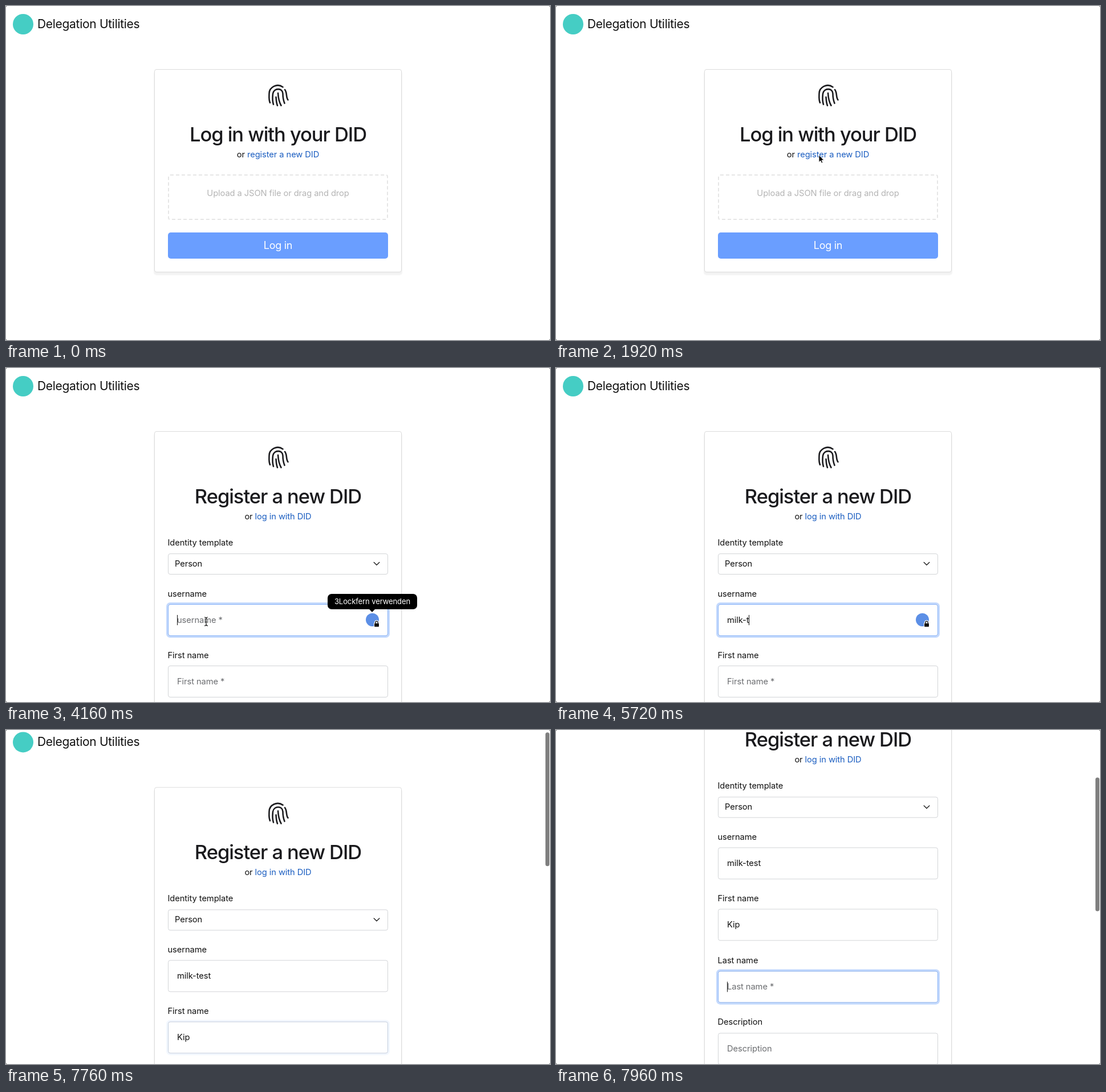
An HTML page for the animation above (8 s loop, 954 by 587 pixels).

```html
<!DOCTYPE html>
<html lang="en">
<head>
<meta charset="utf-8">
<title>DID login</title>
<style>
  html, body { margin: 0; width: 100%; height: 100%; overflow: hidden; background: #333; }
  #stage {
    position: relative; width: 954px; height: 587px; overflow: hidden;
    background: #fff; border-radius: 2px;
    font: 14.7px/20px Inter, "Liberation Sans", sans-serif;
    font-optical-sizing: none; letter-spacing: -.08px; color: #111; white-space: nowrap;
  }
  #stage * { box-sizing: border-box; }
  #page, #page > *, .card > *, .abs, svg { position: absolute; }
  #page { inset: 0; }
  #mark { left: 12px; top: 14px; width: 36px; height: 36px; border-radius: 50%; background: #45cdc4; }
  #brand { left: 55px; top: 17px; font-size: 21px; line-height: 30px; letter-spacing: -.3px; }
  .card {
    left: 260px; top: 110.5px; width: 434px; height: 357px; background: #fff;
    border: 1px solid #dcdcdc; border-radius: 4px; box-shadow: 0 4px 2px 1px rgba(0,0,0,.05);
  }
  #register { height: 1300px; }
  .card > * { left: 23px; width: 386px; margin: 0; }
  h1 {
    top: 90px; text-align: center; font-size: 34.5px; line-height: 48px;
    font-weight: 500; letter-spacing: -1.05px; color: #1a1a1d;
  }
  .alt { top: 139.5px; text-align: center; }
  .alt b { font-weight: 400; color: #1a5dc0; }
  .drop {
    top: 184px; height: 80px; padding-top: 21px; text-align: center; color: #b4b4b4;
    border: 2px dashed #e6e6e6; border-radius: 4px;
  }
  .button {
    top: 286.5px; height: 46px; border-radius: 5px; background: #6a9eff; color: #fff;
    text-align: center; font-size: 18px; line-height: 46px; letter-spacing: -.3px;
  }
  .label { margin-left: -.5px !important; }
  .select, .field {
    display: flex; align-items: center; border: 1px solid #d2d4d7; border-radius: 4px;
  }
  .select { top: 214px; height: 37px; padding-left: 11px; }
  .select svg { right: 12px; top: 11.5px; }
  .field { height: 56px; padding-left: 15px; }
  .field::after {
    content: ""; position: absolute; inset: -1px; border: 1px solid #86b1f8; border-radius: 4px;
    box-shadow: 0 0 0 3px #c3d9fd; opacity: var(--ring, 0);
  }
  .caret { width: 1px; height: 18px; margin-right: -1px; background: #111; }
  .hint { color: #6b6d70; }
  #badge { left: 631px; top: 431px; width: 23px; height: 23px; border-radius: 50%; background: #5c8fe6; }
  #lock { left: 644px; top: 443px; }
  #tip {
    left: 564px; top: 397px; width: 157px; height: 27px; border-radius: 7px; background: #000;
    color: #fff; text-align: center; font-size: 13px; line-height: 27px;
  }
  #tip::after {
    content: ""; position: absolute; left: 72px; top: 26px;
    border: 6px solid transparent; border-top-color: #000; border-bottom: 0;
  }
  #thumb { left: 946px; top: 0; width: 7px; height: 235px; border-radius: 4px; background: #7f7f7f; }
  #mouse { left: 0; top: 0; overflow: visible; }
</style>
</head>
<body>
<div id="stage">
  <div id="page">
    <div id="mark"></div>
    <div id="brand">Delegation Utilities</div>
    <div id="login" class="card">
      <h1>Log in with your DID</h1>
      <div class="alt">or <b>register a new DID</b></div>
      <div class="drop">Upload a JSON file or drag and drop</div>
      <div class="button">Log in</div>
    </div>
    <div id="register" class="card">
      <h1>Register a new DID</h1>
      <div class="alt">or <b>log in with DID</b></div>
      <div class="label" style="top:185.5px">Identity template</div>
      <div class="select">Person
        <svg width="14" height="12" fill="none" stroke="#222" stroke-width="1.4" stroke-linecap="round" stroke-linejoin="round"><path d="M2.2 3.5L7 8.3L11.8 3.5"/></svg>
      </div>
    </div>
    <svg style="left:457px;top:135px" width="42" height="45" viewBox="457 135 42 45" fill="none" stroke="#1c1c1f" stroke-width="2.6" stroke-linecap="round">
      <path d="M463 170C460.500 164 461.500 159 461.500 154A15 14.500 0 0 1 485.500 142.500
        M489 147C493.500 153 490.500 160 494.500 165
        M469 173C466.500 165 467.500 160 468 154C470 143.500 485 143.500 485.500 154C485.500 162 486.500 166 488.500 171
        M473.500 160C474 166 474 170 476 175M477 153C477.500 161 479 169 482.500 175"/>
    </svg>
    <div id="badge" class="abs"></div>
    <svg id="lock" width="12" height="13"><path d="M3.500 6V4.500a2.500 2.500 0 0 1 5 0V6" fill="none" stroke="#fff" stroke-width="3.500"/><rect x="1" y="4.500" width="10" height="8" rx="2" fill="#fff"/><path d="M3.700 6.500V4.500a2.300 2.300 0 0 1 4.600 0V6.500" fill="none" stroke="#111" stroke-width="1.300"/><rect x="2" y="5.700" width="8" height="6" rx="1" fill="#111"/></svg>
    <div id="tip" class="abs">3Lockfern verwenden</div>
  </div>
  <div id="thumb" class="abs"></div>
  <svg id="mouse" width="1" height="1" stroke-linejoin="round">
    <path id="arrow" d="M0 0V12.500L2.900 9.900L4.800 14.200L6.900 13.300L5 9.100H8.900Z" fill="#000" stroke="#fff" stroke-width=".9"/>
    <path id="hand" d="M-2.500 -5.500C-2.500 -7.400 -.2 -7.400 0 -5.500L.6 -1.500C1 -2.900 2.900 -2.600 3 -1.200C3.600 -2.300 5.200 -1.800 5.200 -.6C6.200 -1.100 7.200 -.4 7 1C6.900 3.500 6 5.500 5.500 8H-1.500C-2.200 5.500 -4 4 -5.500 1.600C-6 .2 -4.200 -.4 -2 1.800ZM.6 2V5.500M2.700 2V5.500M4.600 2V5.500" fill="#fff" stroke="#111" stroke-width="1"/>
    <path id="beam" d="M-3 -7Q0 -7 0 -5Q0 -7 3 -7M0 -5V6M-3 8Q0 8 0 6Q0 8 3 8M-1.500 1.500H1.500" fill="none" stroke="#111" stroke-width="1.200"/>
  </svg>
</div>
<script>
const $ = id => document.getElementById(id);
const LOOP = 8000, STEP = 40, NEVER = 1e6;
const SWITCH = 2400, TYPE = 4600;
const scroll = { start: 7702.6, time: 476, dist: 366 };

// Key times hold one entry per typed character.
const fields = [
  { label: "username", top: 396.5, text: "milk-test", keys: [4600, 4720, 4840, 5000, 5480, 5720, 5880, 6040, 6160], focus: [3900, 6400] },
  { label: "First name", top: 505, text: "Kip", keys: [6800, 7040, 7240], focus: [6400, 7640] },
  { label: "Last name", top: 613.5, focus: [7640, NEVER] },
  { label: "Description", hint: "Description", top: 722.3 }
];

// Pointer path: time, x, y.
const path = [
  [80, 500, 600], [400, 490, 510], [880, 474, 408], [1300, 466, 318], [1720, 461, 264], [1920, 461, 262],
  [3100, 461, 262], [3400, 434, 316], [3700, 366, 422], [3840, 351, 445]
];

function add(parent, name, text = "") {
  const el = document.createElement("div");
  el.className = name;
  el.textContent = text;
  return parent.appendChild(el);
}

for (const f of fields) {
  const y = f.top - 111.5;
  add($("register"), "label", f.label).style.top = y - 10 + "px";
  f.box = add($("register"), "field");
  f.box.style.top = y + 18.3 + "px";
  f.typed = add(f.box, "typed");
  f.caret = add(f.box, "caret");
  f.hint = add(f.box, "hint", f.hint || f.label + " *");
}

const clamp = v => Math.max(0, Math.min(1, v));
const show = (el, on) => { el.style.display = on ? "" : "none"; };

// Cubic ease-in-out with control points (.42, 0) and (.58, 1).
function ease(x) {
  let lo = 0, hi = 1;
  for (let i = 0; i < 20; i++) {
    const s = (lo + hi) / 2, r = 1 - s;
    if (3 * r * r * s * .42 + 3 * r * s * s * .58 + s * s * s < x) lo = s; else hi = s;
  }
  return lo * lo * (3 - 2 * lo);
}

function along(t) {
  const i = path.findIndex(p => p[0] > t);
  if (i === 0) return path[0].slice(1);
  if (i < 0) return path[path.length - 1].slice(1);
  const [t0, x0, y0] = path[i - 1], [t1, x1, y1] = path[i];
  const k = (t - t0) / (t1 - t0);
  return [x0 + (x1 - x0) * k, y0 + (y1 - y0) * k];
}

function drawField(f, t) {
  const [start, end] = f.focus || [NEVER, NEVER];
  const count = (f.keys || []).filter(k => k <= t).length;
  const last = count ? f.keys[count - 1] : start;
  const active = t >= start && t < end;
  f.typed.textContent = count ? f.text.slice(0, count) : "";
  show(f.hint, !count);
  show(f.caret, active && (t - last) % 1000 < 500);
  f.box.style.setProperty("--ring", Math.min(clamp((t - start) / 150), clamp((end + 150 - t) / 150)));
}

function drawMouse(t) {
  const [x, y] = along(t);
  const kind = t >= 2280 && t < 3160 ? "hand" : t >= SWITCH && y > 415 ? "beam" : "arrow";
  for (const id of ["arrow", "hand", "beam"]) show($(id), id === kind);
  show($("mouse"), t >= 80 && t < TYPE);
  const dy = kind === "hand" ? 3 : 0;
  $("mouse").style.transform = `translate(${x}px, ${y + dy}px)`;
}

function draw(t) {
  const y = scroll.dist * ease(clamp((t - scroll.start) / scroll.time));
  show($("login"), t < SWITCH);
  show($("register"), t >= SWITCH);
  fields.forEach(f => drawField(f, t));
  const extra = t >= 3920 && t < 6400;
  show($("badge"), extra);
  show($("lock"), extra);
  show($("tip"), t >= 3960 && t < TYPE);
  $("page").style.transform = `translateY(${-y}px)`;
  show($("thumb"), y > 0);
  $("thumb").style.transform = `translateY(${y * .4}px)`;
  drawMouse(t);
}

const begin = performance.now();
function tick() {
  const t = (performance.now() - begin) % LOOP;
  draw(Math.floor(t / STEP) * STEP);
  requestAnimationFrame(tick);
}
tick();
</script>
</body>
</html>
```
